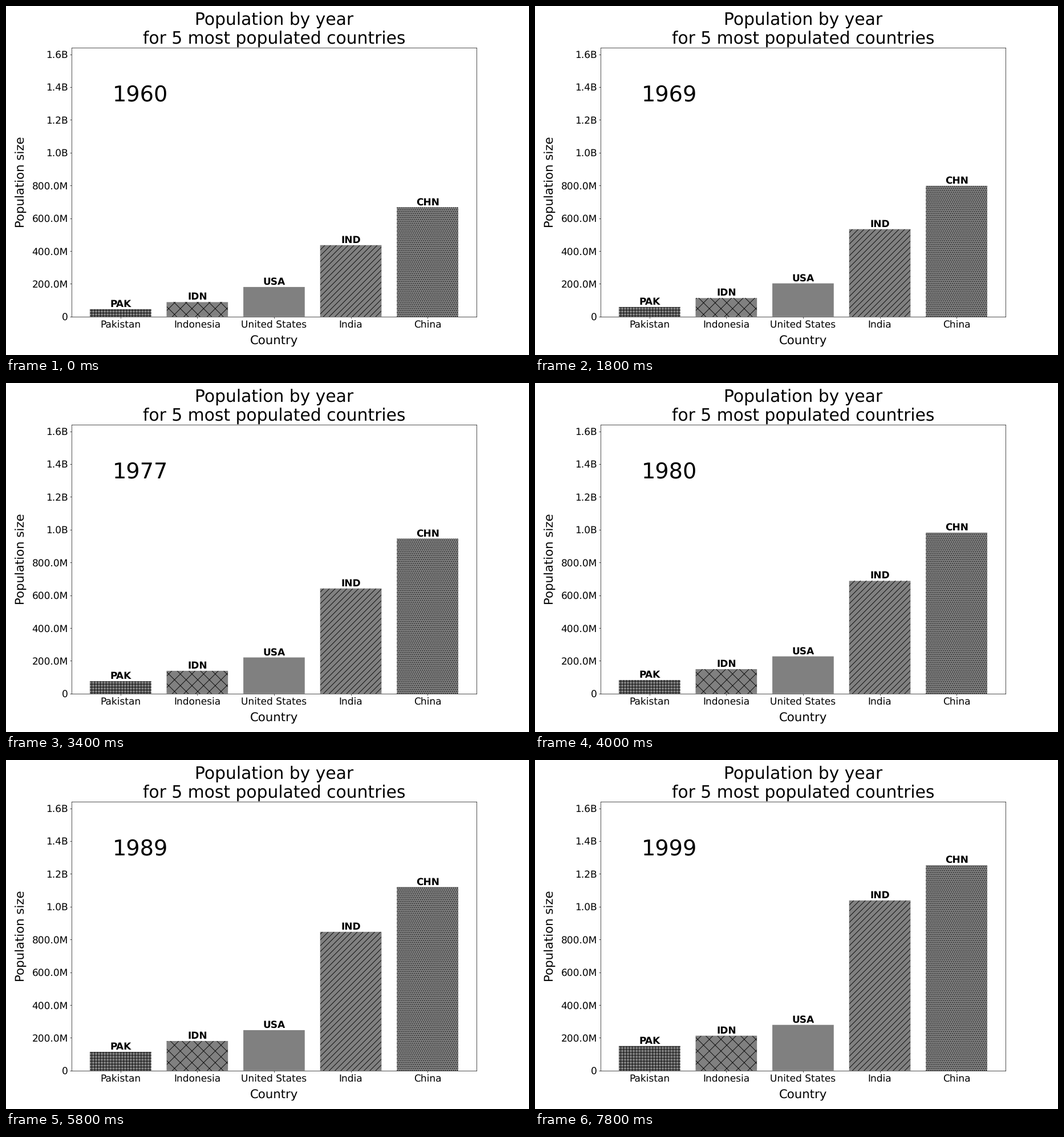
Animation, 917 px wide and 611 px high, one loop 8 s. Source, as a matplotlib script:

```python
import numpy as np
import matplotlib.pyplot as plt
from matplotlib.animation import FuncAnimation
from matplotlib.collections import LineCollection
from matplotlib.patches import PathPatch
from matplotlib.path import Path
from matplotlib.ticker import FuncFormatter
from matplotlib.transforms import Affine2D, IdentityTransform, offset_copy

W, H = 917, 611
DPI = W / 15          # one inch is also one hatch tile
START, YEARS = 1960, 40

plt.rcParams["font.family"] = "DejaVu Sans"
plt.rcParams["text.hinting"] = "no_hinting"


def curve(years, millions):
    """Yearly population on a cubic Hermite curve through a few key years."""
    k, v = np.array(years), np.array(millions) * 1e6
    slope = np.gradient(v, k, edge_order=2)
    x = START + np.arange(YEARS)
    i = np.clip(np.searchsorted(k, x, side="right") - 1, 0, len(k) - 2)
    h = k[i + 1] - k[i]
    t = (x - k[i]) / h
    ease = t * t * (3 - 2 * t)
    return (v[i] + (v[i + 1] - v[i]) * ease
            + h * t * (1 - t) * (slope[i] * (1 - t) - slope[i + 1] * t))


DECADES = [1960, 1970, 1980, 1990, 1999]
countries = {
    "PAK": ("Pakistan", curve(DECADES, [45.7, 60, 83, 118, 150.3])),
    "IDN": ("Indonesia", curve(DECADES, [88.4, 116, 149.3, 184, 213])),
    "USA": ("United States", curve(DECADES, [180.7, 205.1, 227.2, 249.6, 279])),
    "IND": ("India", curve(DECADES, [436, 545.9, 687.4, 865, 1038])),
    # growth dips in the early sixties, so its key years lie closer there
    "CHN": ("China", curve([1960, 1961, 1963, 1970, 1975, 1982, 1990, 1999],
                           [667, 660, 682, 818, 916, 1008, 1135, 1253])),
}
names, pop = zip(*countries.values())
pop = np.array(pop)


def si(v, _):
    if v >= 1e9:
        return f"{v / 1e9:.1f}B"
    return f"{v / 1e6:.1f}M" if v else "0"


fig, ax = plt.subplots(figsize=((W + 0.01) / DPI, (H + 0.01) / DPI), dpi=DPI)
fig.subplots_adjust(left=0.125, right=0.9, bottom=0.11, top=0.88)
bars = ax.bar(range(5), pop[:, 0], color="gray", linewidth=0, snap=False)
ax.set_xlim(-0.64, 4.64)
ax.set_ylim(0, 1.639e9)
ax.set_xticks(range(5), names)
ax.set_yticks(np.arange(9) * 2e8)
ax.yaxis.set_major_formatter(FuncFormatter(si))
ax.tick_params(labelsize=20)
ax.tick_params(axis="x", pad=5)
ax.set_title("Population by year\nfor 5 most populated countries",
             fontsize=35, pad=7)
ax.set_xlabel("Country", fontsize=25, labelpad=10)
ax.set_ylabel("Population size", fontsize=25, labelpad=10)


def nudged(trans, dx, dy):
    return offset_copy(trans, fig, dx, dy, units="dots")


year = ax.text(0.1, 0.8, "", fontsize=45,
               transform=nudged(ax.transAxes, 1, 1))
tags = [ax.text(i, 0, code, fontsize=20, weight="bold", ha="center",
                va="bottom", transform=nudged(ax.transData, 0, 0.5))
        for i, code in enumerate(countries)]


def bar_span(i):
    px = ax.transData.transform([(i - 0.4, 0), (i + 0.4, 0)])
    return px[0, 0], px[1, 0]


def steps(lo, hi, gap, shift=0.0):
    """Multiples of gap (plus a shift in gaps) that cover lo..hi."""
    return (np.arange(np.floor(lo / gap) - 1, np.ceil(hi / gap) + 2) + shift) * gap


def add_lines(i, segs):
    lines = LineCollection(segs, colors="black", linewidths=1, zorder=1.5,
                           transform=IdentityTransform())
    lines.set_snap(False)
    ax.add_collection(lines, autolim=False)
    return i, lines


# Hatch builders work in pixels, with y counted down from the top
def grid(i, gap):
    a, b = bar_span(i)
    segs = [[(x, 0), (x, H)] for x in steps(a, b, gap, 0.5)]
    segs += [[(a - 2, H - y), (b + 2, H - y)] for y in steps(0, H, gap, 0.5)]
    return add_lines(i, segs)


def diagonals(i, gap, cross):
    a, b = bar_span(i)
    a, b = a - 2, b + 2
    segs = [[(a, H - (k - a)), (b, H - (k - b))] for k in steps(a, b + H, gap)]
    if cross:
        segs += [[(a, H - (a - k)), (b, H - (b - k))]
                 for k in steps(a - H, b, gap)]
    return add_lines(i, segs)


def dots(i, gap):
    a, b = bar_span(i)
    r = 0.1 * gap + DPI / 144
    circle = Path.unit_circle()
    parts = [circle.transformed(Affine2D().scale(r).translate(x, H - k * gap))
             for k in range(int(150 / gap), int(H * 0.9 / gap) + 1)
             for x in steps(a, b, gap, 0.5 * (k % 2))]
    patch = PathPatch(Path.make_compound_path(*parts), facecolor="black",
                      linewidth=0, zorder=1.5, transform=IdentityTransform())
    patch.set_snap(False)
    ax.add_artist(patch)
    return i, patch


hatches = [grid(0, DPI / 12), diagonals(1, DPI / 3, True),
           diagonals(3, DPI / 6, False), dots(4, DPI / 18)]


def draw(n):
    for bar, tag, v in zip(bars, tags, pop[:, n]):
        bar.set_height(v)
        tag.set_y(v)
    for i, art in hatches:
        art.set_clip_path(bars[i])
    year.set_text(str(START + n))
    return [*bars, *tags, year, *(art for _, art in hatches)]


anim = FuncAnimation(fig, draw, frames=YEARS, interval=200, repeat=True,
                     repeat_delay=0, init_func=lambda: draw(0))
plt.show()
```
